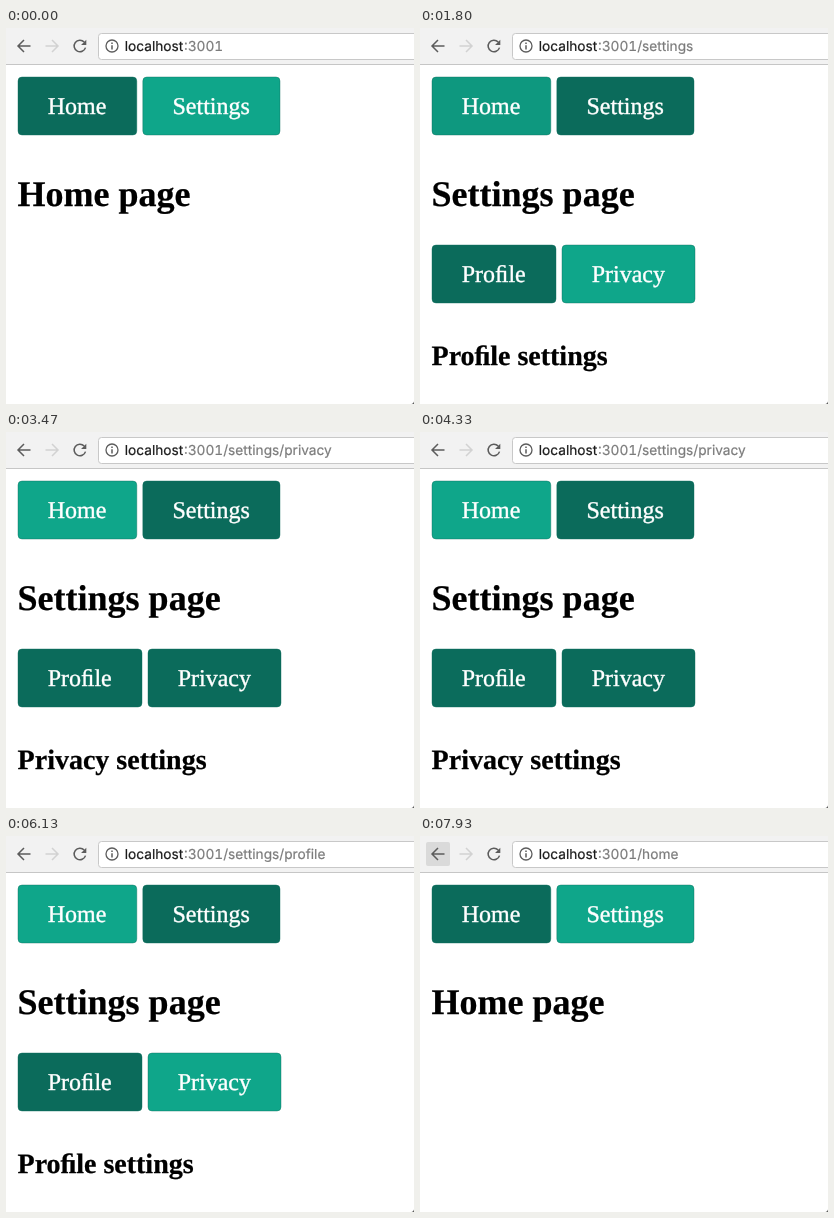
An HTML page that plays this animation: 408 by 376 pixels, repeating every 8000 ms.

```html
<!DOCTYPE html>
<html lang="en">
<head>
<meta charset="utf-8">
<title>Nested tabs</title>
<style>
  html, body { margin: 0; width: 100%; height: 100%; overflow: hidden; background: #fff; }
  svg { display: block; width: 408px; height: 376px; }
  text { stroke-linejoin: round; text-rendering: geometricPrecision; }
  .url { font: 13.7px Inter, Roboto, sans-serif; font-feature-settings: "tnum"; stroke-width: .2; }
  .button rect { stroke: #0b6b5b; stroke-opacity: .5; stroke-width: .8; }
  .button text { font: 24px "Liberation Serif", serif; fill: #fff; stroke: #fff; stroke-width: .4; }
  .title, .subtitle { stroke: #000; stroke-width: .25; }
  .title { font: bold 36px "Liberation Serif", serif; }
  .subtitle { font: bold 28px "Liberation Serif", serif; }
  .icon { fill: none; stroke: #5c5c5c; stroke-width: 1.5; }
</style>
</head>
<body>
<svg viewBox="0 0 408 376">
  <rect width="408" height="376" fill="#fff"/>
  <rect width="408" height="36" fill="#f2f2f2"/>
  <rect y="36" width="408" height="1" fill="#c6c6c6"/>
  <rect id="backHover" x="6" y="6" width="24" height="24" rx="2" fill="#dadada"/>
  <path class="icon" d="M24.5 18H12.5M18 12L12 18L18 24"/>
  <path class="icon" style="stroke:#d2d2d2" d="M39.5 18H51.5M46 12L52 18L46 24"/>
  <path class="icon" d="M78.2 14A5.8 5.8 0 1 0 79.5 19.6"/>
  <path d="M80.3 11.8V17H75.1Z" fill="#5c5c5c"/>
  <rect x="92.5" y="5.5" width="330" height="26" rx="3" fill="#fff" stroke="#c8c8c8"/>
  <circle class="icon" cx="106" cy="18" r="6" style="stroke-width:1.3"/>
  <path class="icon" d="M106 17.2V21.4M106 14.4V15.9"/>
  <text class="url" x="118.8" y="23" fill="#1c1c1c" stroke="#1c1c1c">localhost</text>
  <text class="url" id="path" x="178" y="23" fill="#7b7b7b" stroke="#7b7b7b"></text>

  <g id="mainTabs"></g>
  <text class="title" id="title" x="11.6" y="178"></text>
  <g id="settingsPane">
    <g id="subTabs"></g>
    <text class="subtitle" id="subtitle" x="11.6" y="337"></text>
  </g>
  <path d="M408 373.5V376H405.5Q407.5 375.5 408 373.5Z" fill="#555"/>
</svg>
<script>
const LOOP = 8000, FADE = 250;
const LIGHT = [15, 166, 138], DARK = [11, 107, 91];
const $ = id => document.getElementById(id);

// Each change is [time, value]; a tab value of 1 is dark, 0 is light.
const paths = [[0, ''], [1470, '/settings'], [3270, '/settings/privacy'],
               [4870, '/settings/profile'], [6870, '/home']];
const pages = [[0, 'Home'], [1630, 'Settings'], [7130, 'Home']];
const panes = [[0, 'Profile'], [3470, 'Privacy'], [5100, 'Profile']];
const tabs = [
  { label: 'Home', group: 'mainTabs', x: 12, y: 49, width: 118.8,
    shades: [[0, 1], [1630, 0], [6260, 1]] },
  { label: 'Settings', group: 'mainTabs', x: 136.8, y: 49, width: 137.2,
    shades: [[0, 0], [170, 1], [7130, 0]] },
  { label: 'Profile', group: 'subTabs', x: 12, y: 217, width: 124,
    shades: [[0, 1], [3470, 0], [4100, 1]] },
  { label: 'Privacy', group: 'subTabs', x: 142, y: 217, width: 133,
    shades: [[0, 0], [2570, 1], [5100, 0]] }
];

// Serif text is set with the joined "fi" glyph.
const ligate = text => text.replace('fi', '\uFB01');

function add(parent, name, attributes) {
  const node = document.createElementNS('http://www.w3.org/2000/svg', name);
  for (const key in attributes) node.setAttribute(key, attributes[key]);
  return parent.appendChild(node);
}

for (const tab of tabs) {
  const { x, y, width } = tab;
  const group = add($(tab.group), 'g', { class: 'button' });
  tab.box = add(group, 'rect', { x, y, width, height: 58, rx: 4 });
  add(group, 'text', { x: x + 29.7, y: y + 37 }).textContent = ligate(tab.label);
}

const ease = p => {
  p = Math.max(0, Math.min(1, p));
  return p * p * (3 - 2 * p);
};
const current = (changes, t) => changes.filter(([start]) => start <= t).pop()[1];

function shadeAt(changes, t) {
  let shade = changes[0][1];
  for (const [start, goal] of changes.slice(1))
    shade += (goal - shade) * ease((t - start) / FADE);
  return shade;
}

function setText(id, text) {
  if ($(id).textContent !== text) $(id).textContent = text;
}

function draw(t) {
  const page = current(pages, t);
  setText('path', ':3001' + current(paths, t));
  setText('title', page + ' page');
  setText('subtitle', ligate(current(panes, t)) + ' settings');
  $('settingsPane').setAttribute('visibility', page === 'Settings' ? 'visible' : 'hidden');
  $('backHover').setAttribute('opacity', ease((t - 7800) / 120));
  for (const tab of tabs) {
    const shade = shadeAt(tab.shades, t);
    const color = LIGHT.map((c, i) => Math.round(c + (DARK[i] - c) * shade));
    tab.box.setAttribute('fill', `rgb(${color})`);
  }
}

const begin = performance.now();
function tick() {
  draw((performance.now() - begin) % LOOP);
  requestAnimationFrame(tick);
}
tick();
</script>
</body>
</html>
```
